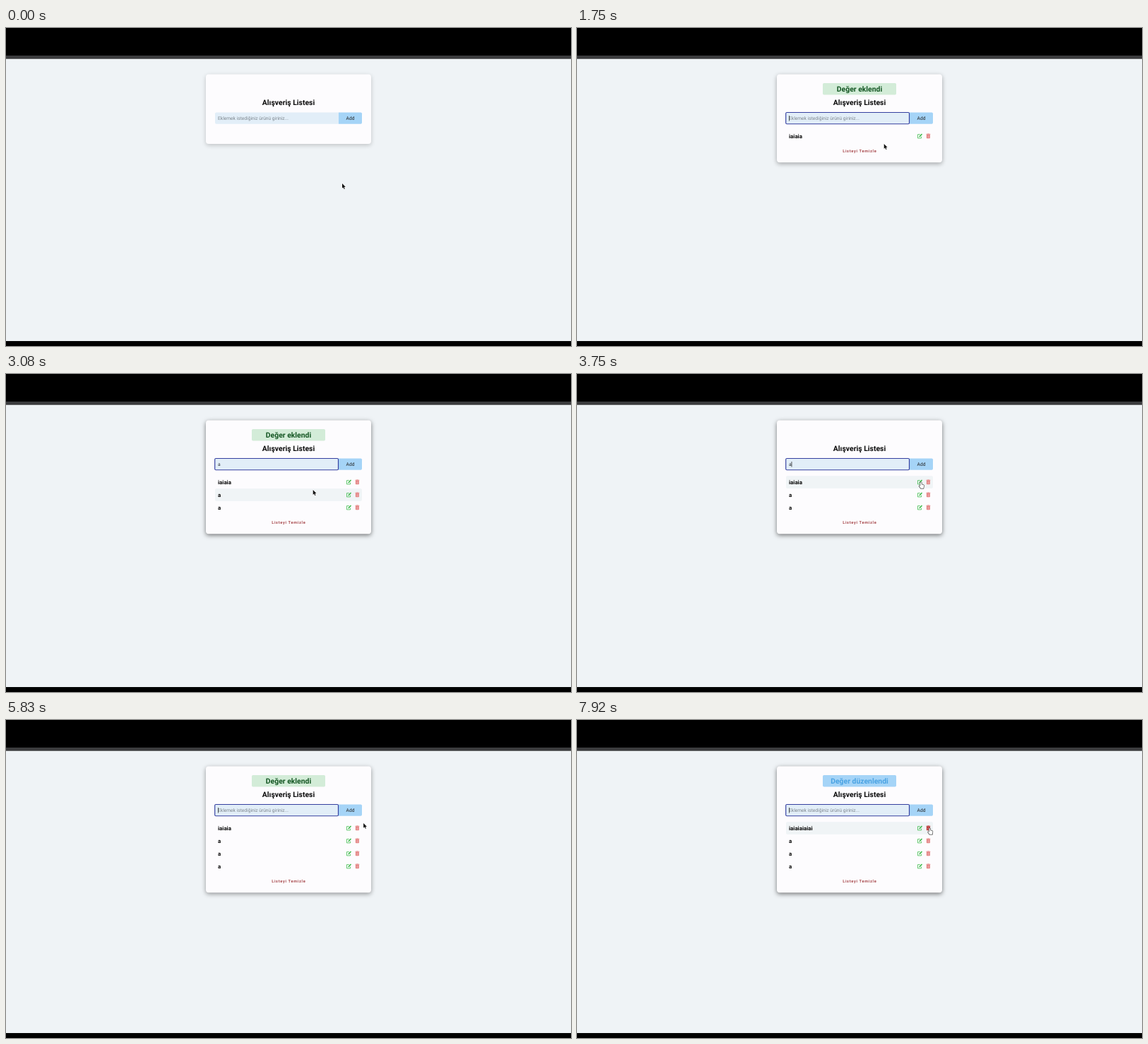
An HTML page with a canvas for the animation above (8000 ms loop, 800 by 450 pixels).

```html
<!DOCTYPE html>
<html lang="tr">
<head>
<meta charset="utf-8">
<title>Alışveriş Listesi</title>
<style>
html, body { margin: 0; width: 100%; height: 100%; overflow: hidden; background: #000 }
canvas { display: block }
</style>
</head>
<body>
<canvas id="stage" width="800" height="450"></canvas>
<script>
const ctx = document.getElementById('stage').getContext('2d');
const LOOP = 8000, FPS = 12, MOVE = 320, FADE = 300, NOTICE = 2000;
const ROW_TOP = 144.3, ROW = 18, ENTER = '\n';
const added = { text: 'Değer eklendi', fill: '#d3ecd8', color: '#155724' };
const changed = { text: 'Değer düzenlendi', fill: '#a5d4f7', color: '#4ba3e3' };

// What the user does: keys typed, one edit click, and pointer moves
const keys = (text, start, gap = 0) => [...text].map((key, i) => ({ time: start + i * gap, key }));
const actions = [
  ...keys('iaiaia' + ENTER, 990, 110),
  ...keys(`a${ENTER}a${ENTER}a`, 1830, 107),
  ...keys(ENTER, 4910),
  { time: 5990, edit: 0 },
  ...keys('iaiai', 6490, 62),
  ...keys(ENTER, 7160),
];
const moves = [
  [290, 430, 128], [900, 434.7, 164], [3120, 487, 153], [4340, 488, 127], [4910, 377, 122],
  [5280, 522, 140], [5600, 487, 153], [6400, 477.7, 150.5], [7580, 499.5, 153],
];

// The list app, replayed up to time t
function appAt(t) {
  const app = { rows: [], value: '', editing: -1, blink: 660, notice: null };
  let hideAt = 0;
  for (const { time, key, edit } of actions) {
    if (time > t) break;
    if (time >= hideAt) app.notice = null;
    if (edit !== undefined) {
      app.editing = edit;
      app.value = app.rows[edit];
    } else if (key === ENTER) {
      const editing = app.editing >= 0;
      if (!app.notice) hideAt = time + NOTICE;
      app.notice = editing ? changed : added;
      app.rows[editing ? app.editing : app.rows.length] = app.value;
      app.value = '';
      app.editing = -1;
    } else {
      app.value += key;
      app.blink = time;
    }
  }
  if (t >= hideAt) app.notice = null;
  app.bottom = app.rows.length ? 172.3 + ROW * app.rows.length : 164;
  return app;
}

function pointerAt(t) {
  let x = 476, y = 220;
  for (const [start, toX, toY] of moves) {
    const p = Math.min(1, Math.max(0, (t - start) / MOVE)), e = p * p * (3 - 2 * p);
    x += (toX - x) * e;
    y += (toY - y) * e;
  }
  return [x, y];
}

const within = (x, y, l, t, r, b) => x >= l && x < r && y >= t && y < b;

// Share of the last FADE ms that the pointer spent over the card
function cardHover(t, samples = 10) {
  let hits = 0;
  for (let i = 0; i < samples; i++) {
    const then = t - FADE * i / samples;
    hits += within(...pointerAt(then), 283, 65.5, 517, appAt(then).bottom);
  }
  return hits / samples;
}

function box(x, y, w, h, radius, fill) {
  ctx.beginPath();
  ctx.roundRect(x, y, w, h, radius);
  ctx.fillStyle = fill;
  ctx.fill();
}

function text(str, x, y, size, color, { weight = 400, align = 'left', spacing = 0 } = {}) {
  ctx.font = `${weight} ${size}px Roboto, sans-serif`;
  ctx.textAlign = align;
  ctx.letterSpacing = spacing + 'px';
  ctx.fillStyle = color;
  ctx.fillText(str, x, y);
}

function shape(d, x, y, { fill, stroke, width = 1 }) {
  const path = new Path2D(d);
  ctx.save();
  ctx.translate(x, y);
  ctx.lineJoin = ctx.lineCap = 'round';
  if (stroke) {
    ctx.strokeStyle = stroke;
    ctx.lineWidth = width;
    ctx.stroke(path);
  }
  if (fill) {
    ctx.fillStyle = fill;
    ctx.fill(path);
  }
  ctx.restore();
}

function editIcon(y) {
  shape('M3.4 1.2H.5V6.5H5.6V4.6', 482, y, { stroke: '#35b843', width: .75 });
  shape('M2.4 5L2.6 3.6L6 .2L7 1.2L3.8 4.7Z', 482, y, { fill: '#35b843' });
}

function trashIcon(y, color) {
  box(494.5, y + .4, 5.8, .9, .2, color);
  box(496.3, y, 2.2, .6, .2, color);
  box(494.9, y + 1.7, 5, 5.2, [0, 0, .8, .8], color);
  for (let i = 0; i < 3; i++) box(496 + i * 1.2, y + 2.6, .4, 3.4, 0, '#fff8');
}

function pointer(x, y) {
  const overIcon = within(x, y, 482, 148, 489, 158) || within(x, y, 494, 148, 501, 158);
  if (within(x, y, 296, 119, 471, 136)) {
    shape('M-1.5 -3.6H1.5M0 -3.6V4.4M-1.5 4.4H1.5', x, y, { stroke: '#555f66', width: .8 });
  } else if (overIcon || within(x, y, 471, 119, 504, 136)) {
    shape('M-.8 .6Q0 -.4 .8 .6V3.2L3.3 3.8Q4.2 4.1 4.1 5L3.6 8.8H-.3L-2.6 5.6Q-2.4 4.6 -.8 5.6Z',
      x, y, { stroke: '#333', width: 1.2, fill: '#fff' });
  } else {
    shape('M0 0V6.8L1.6 5.4L2.7 7.9L3.8 7.4L2.7 5H4.8Z', x, y, { stroke: '#fff', fill: '#111' });
  }
}

function drawCard({ bottom, notice }, hover) {
  ctx.save();
  ctx.shadowColor = `rgba(0,0,0,${.2 + .32 * hover})`;
  ctx.shadowBlur = 6.5;
  ctx.shadowOffsetY = 2;
  box(283, 65.5, 234, bottom - 65.5, 4, '#fdfcfe');
  ctx.restore();
  if (notice) {
    box(348, 78, 104, 16.5, 1.7, notice.fill);
    text(notice.text, 400, 90, 10.42, notice.color, { weight: 700, align: 'center' });
  }
  text('Alışveriş Listesi', 400, 108.7, 10.42, '#0a0a0a', { weight: 700, align: 'center' });
}

function drawForm({ value, editing, blink }, t) {
  const focused = t >= 660;
  box(296, 119.5, 175, 16.3, [1.7, 0, 0, 1.7], '#e2eef8');
  box(471, 119.5, 33, 16.3, [0, 1.7, 1.7, 0], '#a5d4f7');
  text(editing < 0 ? 'Add' : 'Edit', 487.5, 130, 6.67, '#222', { align: 'center' });
  if (focused) {
    ctx.beginPath();
    ctx.roundRect(295.7, 119.5, 174.8, 16.2, 1.5);
    ctx.strokeStyle = '#343fa0';
    ctx.lineWidth = 1.15;
    ctx.stroke();
  }
  text(value || 'Eklemek istediğiniz ürünü giriniz...', 300, 130, 6.65, value ? '#2b3036' : '#7d868e');
  if (focused && (t - blink) % 1000 < 500) {
    box(300 + (value ? ctx.measureText(value).width : 0), 124, .7, 7.4, 0, '#111');
  }
}

function drawRows({ rows, bottom }, x, y) {
  rows.forEach((item, i) => {
    const top = ROW_TOP + i * ROW, over = within(x, y, 296, top, 504, top + ROW);
    if (over) box(296, top, 208, 17.4, 1.7, '#f0f4f6');
    text(item, 300, top + 11.5, 7.88, '#0a0a0a', { weight: 700 });
    editIcon(top + 5.1);
    trashIcon(top + 5.1, over && x > 494 ? '#bb3535' : '#e48282');
  });
  if (rows.length) {
    text('Listeyi Temizle', 400.3, bottom - 14.5, 5.7, '#a84a4e', { weight: 700, align: 'center', spacing: .66 });
  }
}

function draw(t) {
  const app = appAt(t), [x, y] = pointerAt(t);
  box(0, 0, 800, 450, 0, '#000');
  box(0, 39, 800, 404, 0, '#eff3f6');
  box(0, 39, 800, 4.7, 0, '#3b3b3d');
  drawCard(app, cardHover(t));
  drawForm(app, t);
  drawRows(app, x, y);
  pointer(x, y);
}

ctx.textRendering = 'geometricPrecision';
function tick() {
  const t = performance.now() % LOOP;
  draw(Math.floor(t * FPS / 1000 + .01) * 1000 / FPS);
  requestAnimationFrame(tick);
}
tick();
</script>
</body>
</html>
```
